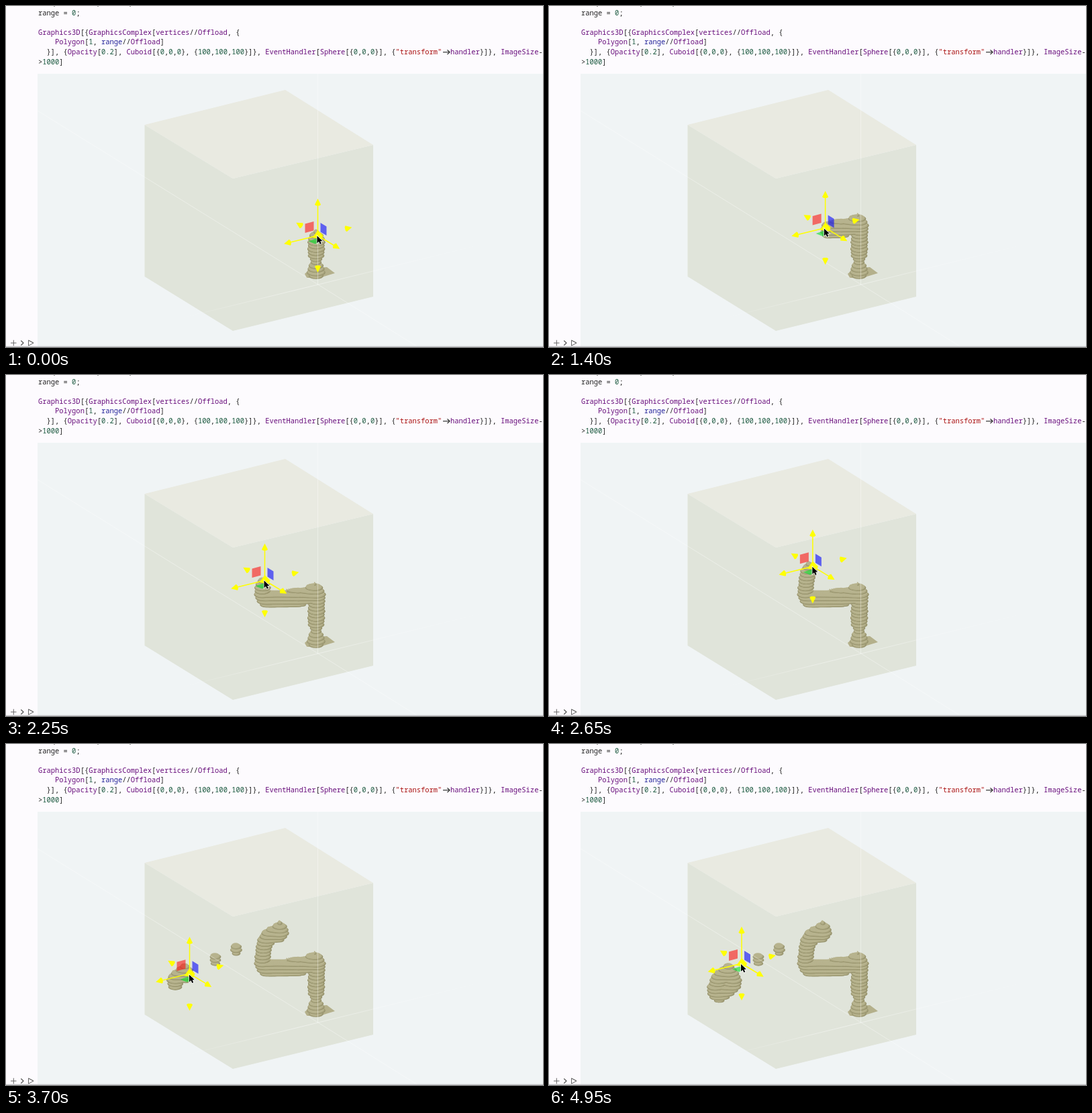
Write an HTML page with a canvas that moves like this. It is 800 by 508 pixels and loops after 5000 ms.

```html
<!DOCTYPE html>
<html lang="en">
<head>
<meta charset="utf-8">
<title>Drawing in a volume</title>
<style>
  html, body { margin: 0; width: 100%; height: 100%; overflow: hidden; background: #fdfbfe; }
  canvas { position: absolute; left: 0; top: 0; }
  pre {
    position: absolute; left: 48px; top: 2.7px; margin: 0; color: #222;
    font: 10.45px/14.6px "Noto Sans Mono", monospace; font-variant-ligatures: none;
  }
  b { font-weight: normal; color: #680e7c; }
  i { font-style: normal; color: #1c5a40; }
  u { text-decoration: none; color: #a11; }
  em { font-style: normal; color: #229; }
</style>
</head>
<body>
<canvas id="stage" width="800" height="508"></canvas>
<pre>range = <i>0</i>;

<b>Graphics3D</b>[{<b>GraphicsComplex</b>[<b>vertices</b>//<b>Offload</b>, {
    <b>Polygon</b>[<i>1</i>, <em>range</em>//<b>Offload</b>]
  }], {<b>Opacity</b>[<i>0.2</i>], <b>Cuboid</b>[{<i>0</i>,<i>0</i>,<i>0</i>}, {<i>100</i>,<i>100</i>,<i>100</i>}]}, <b>EventHandler</b>[<b>Sphere</b>[{<i>0</i>,<i>0</i>,<i>0</i>}], {<u>"transform"</u>  <b>handler</b>}]}, <b>ImageSize</b>-
><i>1000</i>]</pre>
<script>
const LOOP = 5000, STEP = 50, LAG = 100, SLICE = 5;
const ctx = document.getElementById('stage').getContext('2d');

// Waypoints of the dragged gizmo: time, x, y
const path = [
  [-900, 464, 391], [-750, 464, 366], [0, 464.5, 342], [450, 464, 321], [900, 440, 328],
  [1850, 389, 329], [2250, 385.5, 306], [2600, 391, 287], [3000, 410, 276], [3050, 410, 276],
  [3100, 345, 302], [3150, 314, 317], [3200, 256, 350], [3550, 268, 338], [3900, 277, 352],
  [4250, 258.5, 367], [4600, 250, 360], [4850, 270, 334], [4950, 287, 327],
];

// Catmull-Rom curve through the waypoints
function gizmoAt(t) {
  const last = path.length - 1;
  const i = path.findLastIndex(p => p[0] <= t);
  if (i === last) return path[last].slice(1);
  const [a, b, c, d] = [-1, 0, 1, 2].map(k => path[Math.min(last, Math.max(0, i + k))]);
  const u = (t - b[0]) / (c[0] - b[0]);
  return [1, 2].map(k => b[k] + u / 2 * (c[k] - a[k]
    + u * (2 * a[k] - 5 * b[k] + 4 * c[k] - d[k] + u * (3 * (b[k] - c[k]) + d[k] - a[k]))));
}

// One dab of material per step; quick moves leave thinner, separate dabs
const dabs = [];
for (let t = path[0][0]; t < LOOP; t += STEP) {
  const [x, y] = gizmoAt(t), [px, py] = gizmoAt(Math.max(path[0][0], t - STEP));
  dabs.push({ t, x: x - 2, y: y + 4, r: Math.max(9, 13.5 - Math.hypot(x - px, y - py) / 2) });
}

function poly(points, fill, x = 0, y = 0) {
  ctx.beginPath();
  points.forEach(([px, py]) => ctx.lineTo(x + px, y + py));
  ctx.closePath();
  ctx.fillStyle = fill;
  ctx.fill();
}

function line(points, color, width = 1) {
  ctx.beginPath();
  points.forEach(p => ctx.lineTo(...p));
  ctx.strokeStyle = color;
  ctx.lineWidth = width;
  ctx.stroke();
}

function drawPage(caret) {
  ctx.fillStyle = '#fdfbfe';
  ctx.fillRect(0, 0, 800, 508);
  ctx.fillStyle = '#f0f4f5';
  ctx.fillRect(47, 101, 753, 406);
  ctx.fillStyle = '#999';
  [71, 136, 184].forEach(x => ctx.fillRect(x, 0, 2, 1));
  line([[651, 68.8], [661, 68.8]], '#222', 1.1);
  line([[657.5, 65.5], [661, 68.8], [657.5, 72]], '#222', 1.1);
  poly([[206.5, 177], [338, 257], [547, 207], [547, 433], [338, 484], [206.5, 403]], '#e0e4da');
  poly([[206.5, 177], [416, 125], [547, 207], [338, 257]], '#e9eae1');
  if (caret) line([[47.5, 103], [47.5, 507]], '#222');
}

function drawFrame() {
  line([[0, 507.3], [800, 507.3]], '#b5b5b8');
  line([[7, 502], [15.5, 502]], '#666');
  line([[11.3, 497.7], [11.3, 506.3]], '#666');
  line([[22.3, 498.5], [26, 502], [22.3, 505.5]], '#555', 1.2);
  line([[33.5, 498], [41, 502], [33.5, 506], [33.5, 498], [41, 502]], '#666');
}

// Horizontal slices stacked from the bottom up, each with a shaded lower rim
function drawMesh(t) {
  const laid = dabs.filter(d => d.t <= t - LAG);
  poly([[445, 399], [454, 391], [478, 389], [490, 398], [467, 405], [448, 405]], '#b4b08b');
  for (let y = 402; y > 255; y -= SLICE) {
    const slice = laid.filter(d => Math.abs(y - d.y) < d.r);
    ['#98946e', '#aca882', '#b7b38e'].forEach((color, i) => {
      ctx.fillStyle = color;
      for (const d of slice) {
        const rx = Math.sqrt(d.r ** 2 - (y - d.y) ** 2) + Math.sin(y * 7) * 0.5;
        ctx.beginPath();
        ctx.ellipse(d.x - i * 0.4, y - i * 0.9, Math.max(1, rx - i), Math.max(1, rx) * 0.3 + 1.5, 0, 0, 7);
        ctx.fill();
      }
    });
  }
}

function drawAxes() {
  const white = 'rgba(255,255,255,.36)';
  line([[464.5, 101], [464.5, 415]], white);
  line([[47, 156], [465, 415], [612, 507]], white);
  const fade = ctx.createLinearGradient(250, 0, 730, 0);
  fade.addColorStop(0, 'rgba(255,255,255,0)');
  fade.addColorStop(0.4, 'rgba(255,255,255,.45)');
  fade.addColorStop(1, 'rgba(255,255,255,0)');
  line([[250, 467.5], [465, 415], [730, 350]], fade);
}

function arrow(x, y, dx, dy, shaft) {
  if (shaft) line([[x, y], [x + dx, y + dy]], '#ff0', 1.5);
  const n = Math.hypot(dx, dy), ux = dx / n, uy = dy / n;
  const point = (along, side) => [dx + ux * along - uy * side, dy + uy * along + ux * side];
  poly([point(5.5, 0), point(-3.5, 4.6), point(-5, 2.5), point(-5, -2.5), point(-3.5, -4.6)], '#ff0', x, y);
}

function drawGizmo(x, y) {
  poly([[-19, -17.5], [-6, -21], [-6, -7.5], [-19, -4]], 'rgba(255,0,0,.54)', x, y);
  poly([[4, -19], [13, -13.5], [13, 0], [4, -5.5]], 'rgba(0,0,255,.58)', x, y);
  poly([[-14, 8.5], [-3, 4.5], [6, 8.5], [-4, 12.5]], 'rgba(0,225,40,.58)', x, y);
  arrow(x, y, 0, -49.5, true);
  arrow(x, y, -45, 11, true);
  arrow(x, y, 28, 17, true);
  arrow(x, y, 0, 49.5);
  arrow(x, y, 45.5, -11);
  arrow(x, y, -27.5, -16.5);
  poly([[0, -8], [8, 0], [6, 5], [-2, 4], [-8, 3]], '#ff0', x, y);
}

function drawPointer(x, y) {
  poly([[0, 0], [0, 10.8], [2.6, 8.4], [4.3, 12.3], [6.2, 11.5], [4.6, 7.8], [7.8, 7.6]], '#000', x, y);
  ctx.strokeStyle = 'rgba(255,255,255,.85)';
  ctx.lineWidth = 1.6;
  ctx.stroke();
  ctx.fill();
}

function render(now) {
  const t = Math.floor(now % LOOP / STEP) * STEP;
  const [px, py] = gizmoAt(t + 12); // the pointer runs slightly ahead
  drawPage((t + 800) % 1200 < 600);
  drawMesh(t);
  drawAxes();
  drawGizmo(...gizmoAt(t));
  drawPointer(px - 1, py + 1);
  drawFrame();
}

const start = performance.now();
(function tick() {
  render(performance.now() - start);
  requestAnimationFrame(tick);
})();
</script>
</body>
</html>
```
